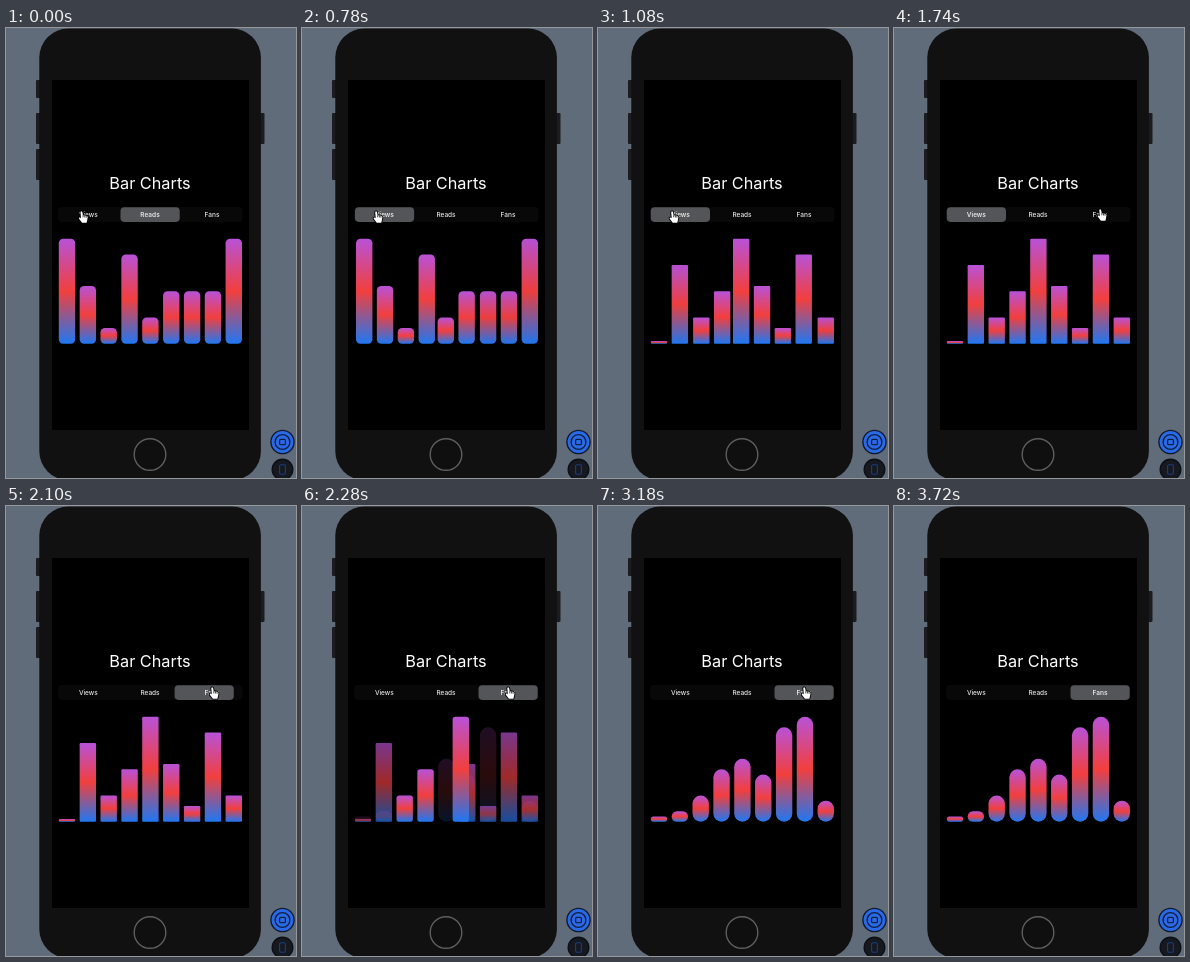
An HTML page with a canvas that plays this animation: 290 by 450 pixels, repeating every 3840 ms.

```html
<!DOCTYPE html>
<html lang="en">
<head>
<meta charset="utf-8">
<title>Bar Charts</title>
<style>
  html, body { margin: 0; width: 100%; height: 100%; overflow: hidden; background: #616c7b; }
  canvas { display: block; width: 290px; height: 450px; }
</style>
</head>
<body>
<canvas id="stage"></canvas>
<script>
const W = 290, H = 450, LOOP = 3840;
const canvas = document.getElementById('stage');
const ctx = canvas.getContext('2d');
const ratio = window.devicePixelRatio || 1;
canvas.width = W * ratio;
canvas.height = H * ratio;

const tabs = [
  { name: 'Views', x: 82.3, radius: 1.2, data: [5, 150, 50, 100, 200, 110, 30, 170, 50] },
  { name: 'Reads', x: 144, radius: 4.5, data: [200, 110, 30, 170, 50, 100, 100, 100, 200] },
  { name: 'Fans', x: 206, radius: 8.2, data: [10, 20, 50, 100, 120, 90, 180, 200, 40] }
];
const [views, reads, fans] = tabs;

// The selection slides first, then the bars follow.
const changes = [
  { from: reads, to: views, at: 755 },
  { from: views, to: fans, at: 2171 }
];
const BAR_TIME = 350, SLIDE_LEAD = 240, SLIDE_TIME = 340;

const cursorMoves = [
  { from: [72.5, 183], to: [71.2, 183], start: 60, end: 420 },
  { from: [71.2, 183], to: [203.3, 181], start: 1170, end: 1610 },
  { from: [203.3, 181], to: [250, 456], start: 3330, end: 3690 }
];
const hand = new Path2D('M2.2 1Q3.2-.2 4.2 1L5 4.6Q9.5 4.6 10.3 6.8L9.6 10.5 9 13H4L.6 8.6Q.2 7 2 7.4L2.8 8Z');
const knuckles = new Path2D('M5 4.6V7M6.9 5V7.2M8.6 5.6V7.5');

const clamp = v => Math.max(0, Math.min(1, v));
const lerp = (a, b, p) => a + (b - a) * p;
const progress = (t, start, end) => clamp((t - start) / (end - start));
const easeInOut = p => p * p * (3 - 2 * p);
const easeOut = p => 1 - (1 - p) ** 4;

function box(x, y, w, h, r, color) {
  ctx.fillStyle = color;
  ctx.beginPath();
  ctx.roundRect(x, y, w, h, r);
  ctx.fill();
}

function outline(x, y, w, h, r, color, line) {
  ctx.strokeStyle = color;
  ctx.lineWidth = line;
  ctx.beginPath();
  ctx.roundRect(x, y, w, h, r);
  ctx.stroke();
}

function circle(x, y, r, fill, stroke, line = 1) {
  ctx.beginPath();
  ctx.arc(x, y, r, 0, Math.PI * 2);
  if (fill) { ctx.fillStyle = fill; ctx.fill(); }
  if (stroke) { ctx.strokeStyle = stroke; ctx.lineWidth = line; ctx.stroke(); }
}

function text(label, x, y, font, color) {
  ctx.font = font;
  ctx.fillStyle = color;
  ctx.textAlign = 'center';
  ctx.fillText(label, x, y);
}

function drawPhone() {
  ctx.fillStyle = '#616c7b';
  ctx.fillRect(0, 0, W, H);
  for (const [x, y, h] of [[30, 52, 18], [30, 85, 31], [30, 121, 31], [254, 85, 31]]) {
    box(x, y, 4.5, h, 1, '#1b1c1f');
  }
  box(33.3, 0.6, 221.6, 451.6, 29, '#111112');
  ctx.fillStyle = '#000';
  ctx.fillRect(46, 52, 197, 350);
  circle(144, 426.5, 15.8, '#0f0f10', '#5e5e60', 1.4);
}

function drawButtons() {
  const ink = '#0f1f42';
  circle(276.5, 414, 11.6, '#2a6ae6', '#101a2e', 1.4);
  circle(276.5, 414, 7.4, null, ink, 1.4);
  outline(273.6, 411.4, 5.8, 5.2, 1.2, ink, 1.3);
  circle(276.5, 441.5, 10.3, '#161a20', '#0c0f14', 1.4);
  outline(273.6, 436.8, 5.8, 9.4, 1.4, '#1a3c80', 1.1);
}

function drawPicker(t) {
  box(52, 179, 184.5, 15, 4, '#080809');
  let x = reads.x;
  for (const { to, at } of changes) {
    const start = at - SLIDE_LEAD;
    x = lerp(x, to.x, easeOut(progress(t, start, start + SLIDE_TIME)));
  }
  box(x - 29.5, 179.3, 59.2, 14.6, 3.8, '#545558');
  for (const tab of tabs) {
    const weight = Math.abs(x - tab.x) < 20 ? 600 : 500;
    text(tab.name, tab.x, 189, `${weight} 6.5px Inter, sans-serif`, '#e6e6e6');
  }
}

function drawBar(slot, value, radius, alpha) {
  const h = value * 0.5245, bottom = 315.7, top = bottom - h;
  const fill = ctx.createLinearGradient(0, top, 0, bottom);
  fill.addColorStop(0, '#b852d8');
  fill.addColorStop(0.5, '#f23f3d');
  fill.addColorStop(1, '#2077f2');
  ctx.globalAlpha = alpha;
  box(52.8 + slot * 20.85, top, 16.4, h, Math.min(radius, h / 2), fill);
  ctx.globalAlpha = 1;
}

// Equal values travel to their new slot; the rest fade.
function drawBars(t) {
  const { from, to, at } = t < 1500 ? changes[0] : changes[1];
  const p = easeInOut(progress(t, at, at + BAR_TIME));
  const kept = new Set();
  const origins = to.data.map(value => {
    const i = from.data.findIndex((v, n) => v === value && !kept.has(n));
    if (i >= 0) kept.add(i);
    return i;
  });
  from.data.forEach((value, i) => {
    if (!kept.has(i)) drawBar(i, value, from.radius, (1 - p) ** 1.6);
  });
  to.data.forEach((value, i) => {
    const origin = origins[i];
    if (origin < 0) drawBar(i, value, to.radius, p ** 1.2);
    else drawBar(lerp(origin, i, p), value, lerp(from.radius, to.radius, p), 1);
  });
}

function drawCursor(t) {
  let [x, y] = cursorMoves[0].from;
  for (const { from, to, start, end } of cursorMoves) {
    if (t < start) break;
    const p = easeInOut(progress(t, start, end));
    x = lerp(from[0], to[0], p);
    y = lerp(from[1], to[1], p);
  }
  ctx.save();
  ctx.translate(x, y);
  ctx.scale(0.9, 0.9);
  ctx.lineJoin = 'round';
  ctx.strokeStyle = '#000';
  ctx.lineWidth = 2;
  ctx.stroke(hand);
  ctx.fillStyle = '#fff';
  ctx.fill(hand);
  ctx.lineWidth = 0.8;
  ctx.stroke(knuckles);
  ctx.restore();
}

function draw(t) {
  ctx.setTransform(ratio, 0, 0, ratio, 0, 0);
  drawPhone();
  text('Bar Charts', 144, 161, '16.3px Inter, sans-serif', '#fff');
  drawPicker(t);
  drawBars(t);
  drawButtons();
  drawCursor(t);
}

const began = performance.now();
function tick() {
  const t = (performance.now() - began) % LOOP;
  draw(Math.floor(t / 60) * 60);
  requestAnimationFrame(tick);
}
tick();
</script>
</body>
</html>
```
